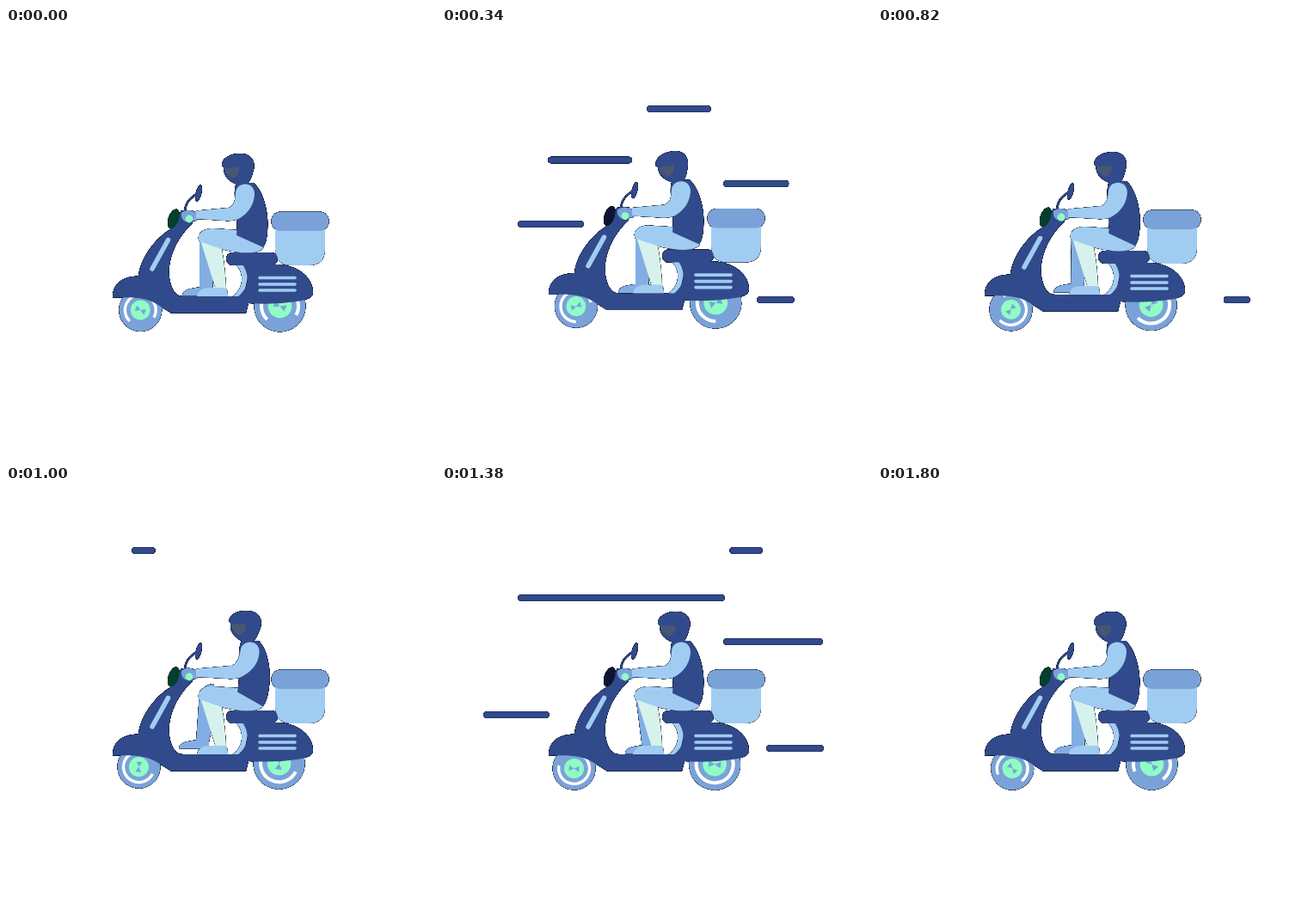
An HTML page for the animation above (1820 ms loop, 500 by 500 pixels).

```html
<!DOCTYPE html>
<html lang="en">
<head>
<meta charset="utf-8">
<title>Scooter ride</title>
<style>
html, body { margin: 0; width: 100%; height: 100%; overflow: hidden; background: #fff; }
svg { display: block; width: 100vw; height: 100vh; }
.dark { fill: #314a8b; }
.mid { fill: #7aa2d9; }
.light { fill: #a1ccf2; }
.far { fill: #82aee3; }
.mint { fill: #d7f2ec; }
.green { fill: #8ffcc5; }
.line { fill: none; stroke: #a1ccf2; stroke-linecap: round; }
</style>
</head>
<body>
<svg viewBox="0 0 500 500">
  <defs>
    <!-- Dark fringe under soft edges -->
    <filter id="fringe" filterUnits="userSpaceOnUse" x="0" y="0" width="500" height="500" color-interpolation-filters="sRGB">
      <feComponentTransfer in="SourceAlpha" result="edge"><feFuncA type="linear" slope="4"/></feComponentTransfer>
      <feMerge><feMergeNode in="edge"/><feMergeNode in="SourceGraphic"/></feMerge>
    </filter>
    <g id="wheel">
      <circle class="mid" r="30"/>
      <circle r="21.500" fill="none" stroke="#fff" stroke-width="4" pathLength="360" stroke-dasharray="255 105" transform="rotate(110)"/>
      <circle class="green" r="13.800"/>
      <path class="mid" d="M0 0L-7 -4V4ZM0 0L7 -4V4Z"/>
    </g>
  </defs>
  <g filter="url(#fringe)">
    <g id="wind" stroke="#314a8b" stroke-width="7.500" stroke-linecap="round"></g>
    <g id="ride">
      <use href="#wheel" id="front"/>
      <use href="#wheel" id="back"/>

      <path class="light" d="M313 228H371V257Q371 276 352 276H332Q313 276 313 257Z"/>
      <rect class="mid" x="308.500" y="213.500" width="67" height="22.500" rx="11"/>

      <path class="light" d="M266 274C278 284 277 304 262 313H276L284 276Z"/>
      <path class="dark" d="M124 313.500C124 300 132 289 154 288.500C157 263 178 242 191 234L204 212H218L217 227C197 245 184 275 192 299Q196 312 206 312H270C282 303 284 288 275 275H316C342 276 357 292 357 307C357 314 350 316 338 318Q312 322 282 320L279 331.500H192L180 324C164 312 146 313 124 313.500Z"/>
      <rect class="dark" x="256" y="261" width="60" height="15" rx="7.500"/>
      <path class="line" stroke-width="3.600" d="M295 290.500H336M295 298H336M295 305H336"/>
      <path class="line" stroke-width="5.500" d="M188.500 246.500L170 280"/>

      <path class="far" id="farLeg"/>
      <path class="far" id="farShoe" d="M205 311.500C205 304 214 303 224 301.500H240V311.500Z"/>
      <path class="mint" d="M224 240L244 304H256C255 280 252 258 248 246Z"/>
      <path class="light" d="M222 312C223 305 229 302 238 302H254Q258 303 258 312Z"/>
      <path class="light" d="M300 254C298 263 276 263 254 258Q238 253 224.500 248C221 238 231 233 240 233L272 235Z"/>

      <g id="torso">
        <path class="dark" d="M268 180H288C300 191 306 216 304 236Q303 250 299 255L268 241C271 215 262 194 268 180Z"/>
        <g id="head">
          <path class="dark" d="M251 160C251 150 263 145.500 274 146C288 147 291 159 287 168Q285 177 280 182L266 181C256 176 253 170 253 162Z"/>
          <path fill="#475773" d="M254 162.500L271 162Q273 171 264 175Q255 171 254 162.500Z"/>
        </g>
      </g>

      <path d="M208 215C208 204 213 198 222 193" fill="none" stroke="#314a8b" stroke-width="2.200"/>
      <ellipse class="dark" cx="224" cy="192" rx="3.200" ry="9.800" transform="rotate(14 224 192)"/>
      <ellipse id="lamp" cx="194.800" cy="222" rx="6" ry="11.800" transform="rotate(19 194.800 222)"/>
      <path class="mid" d="M204 215Q210 210 217 213L224 215L222 224L208 225Q203 221 204 215Z"/>
      <path class="light" id="arm"/>
      <circle class="green" cx="213" cy="222" r="4.400"/>
    </g>
  </g>
</svg>
<script>
const LOOP = 1820, TURNS = 6, GROW = 200;
const $ = id => document.getElementById(id);
const set = (el, name, value) => el.setAttribute(name, value);
const clamp = v => Math.max(0, Math.min(1, v));

// Smooth rise and fall from 0 to 1 to 0 between two times
const bump = (t, from, to) => Math.sin(Math.PI * clamp((t - from) / (to - from))) ** 2;

// Two waves of gusts, started one after another: y, x, length, time gone
const waves = [
  { start: 60, gusts: [[228, 88, 77, 715], [94, 238, 75, 580], [153.5, 123, 98, 580], [181, 327, 93, 580], [316, 366, 67, 900]] },
  { start: 983, gusts: [[75, 146, 227, 1409], [130, 88, 241, 1600], [181, 327, 116, 1659], [266, 48, 77, 1790], [305, 377, 67, 1790]] }
];
const gusts = waves.flatMap(wave => wave.gusts.map(([y, x, length, end], i) => {
  const el = document.createElementNS("http://www.w3.org/2000/svg", "path");
  $("wind").append(el);
  return { el, y, x: x + 4, length: length - 8, start: wave.start + 40 * i, end };
}));

function blow({ el, y, x, length, start, end }, t) {
  const head = clamp((t - start) / GROW), tail = clamp(1 - (end - t) / GROW);
  set(el, "d", head > tail ? `M${x + length * tail} ${y}H${x + length * head}` : "");
}

// Wheels turn slightly off centre
function spin(el, x, y, wobble, size, turn) {
  const a = turn * Math.PI / 180;
  set(el, "transform", `translate(${x + wobble * Math.cos(a)} ${y + wobble * Math.sin(a)}) rotate(${turn + 25}) scale(${size})`);
}

function drawArm(lean) {
  const s = lean * 1.1, e = s * 0.6;
  set($("arm"), "d", `M221 212.5L${259 + e} 209Q${267 + e} 206 ${267 + s} 192
    C${268 + s} 178 ${289 + s} 178 ${289 + s} 193
    Q${288 + s} 211 ${272 + e} 221Q${265 + e} 225 ${254 + e} 224L221 222Z`);
}

function drawFarLeg(dx, up) {
  set($("farLeg"), "d", `M225 ${242 - up * 0.3}Q${230 + up * 0.3} ${236 - up} ${238 + up * 0.6} ${236 - up}
    L243 262L${240 + dx} ${304 - up}H${225 + dx}Z`);
  set($("farShoe"), "transform", `translate(${dx} ${-up})`);
}

function draw(now) {
  const t = now % LOOP;
  const turn = -360 * TURNS * t / LOOP;
  const bob = 5 * bump(t, 1380, 1800) - 5 * bump(t, 30, 1040);
  const lean = 5.2 * bump(t, 750, 1300) - 1.6 * bump(t, 1380, 1800);

  gusts.forEach(g => blow(g, t));
  set($("ride"), "transform", `translate(0 ${bob})`);
  spin($("front"), 154.9, 328, 1.4, 25 / 30, turn);
  spin($("back"), 317.8, 323.4, 0.7, 1, turn);
  set($("torso"), "transform", `rotate(${lean} 285 252)`);
  set($("head"), "transform", `rotate(${-11 * bump(t, 0, 1000)} 275 178)`);
  drawArm(lean);
  drawFarLeg(8 * bump(t, 1150, 1650) - 4 * bump(t, 750, 1250), 6 * bump(t, 700, 1300));

  const blink = t % 1000;
  set($("lamp"), "fill", blink > 200 && blink < 500 ? "#0d1530" : "#033f30");
  requestAnimationFrame(draw);
}
requestAnimationFrame(draw);
</script>
</body>
</html>
```
